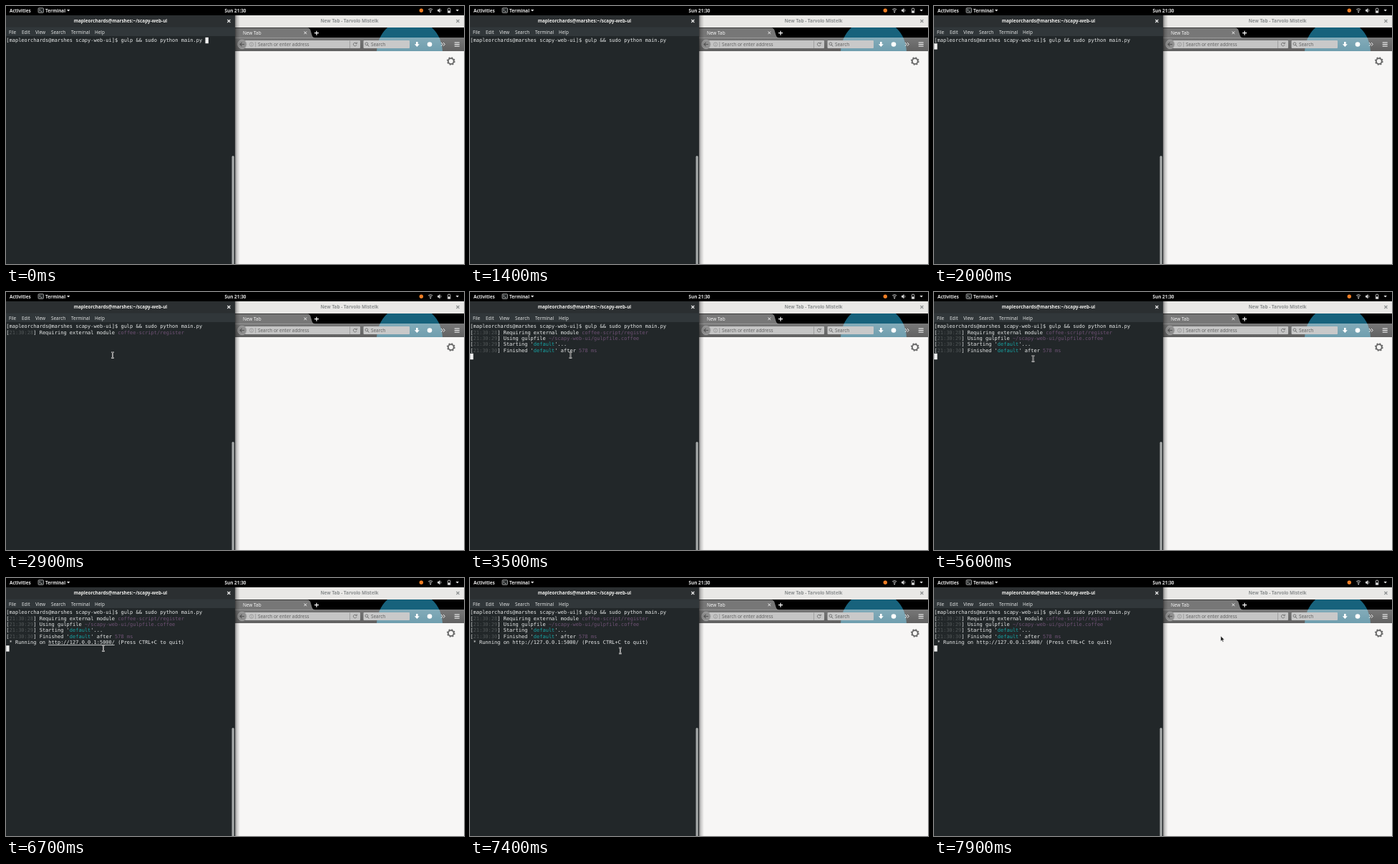
Recreate the animation shown at these times as an HTML page. Size 640 by 360 pixels, loop 8000 ms.

```html
<!DOCTYPE html>
<html lang="en">
<head>
<meta charset="utf-8">
<title>Terminal and browser</title>
<style>
html, body { margin: 0; width: 100%; height: 100%; overflow: hidden; background: #000; }
svg { display: block; width: 640px; height: 360px; }
text { font: 6.4px "Noto Sans", "Open Sans", sans-serif; white-space: pre; }
.bold { font-weight: 700; }
.semi { font-weight: 600; }
#term text { font: 7px "DejaVu Sans Mono", monospace; fill: #e9ebeb; }
#term .dim { fill: #525758; }
#term .path { fill: #6f5275; }
#term .task { fill: #16a5a5; }
.line { fill: none; stroke: currentColor; }
</style>
</head>
<body>
<svg viewBox="0 0 640 360">
  <defs>
    <clipPath id="chrome"><rect x="320" y="30" width="320" height="33"/></clipPath>
    <linearGradient id="bar" x2="0" y2="1">
      <stop stop-color="#fff" stop-opacity=".47"/><stop offset="1" stop-color="#fff" stop-opacity=".38"/>
    </linearGradient>
    <linearGradient id="shade">
      <stop stop-opacity=".5"/><stop offset=".35" stop-opacity=".2"/><stop offset="1" stop-opacity="0"/>
    </linearGradient>
  </defs>
  <rect width="640" height="360"/>

  <!-- desktop bar -->
  <g fill="#e6e6e6" color="#e6e6e6">
    <text class="semi" x="5" y="8.5">Activities</text>
    <rect x="45" y="2.8" width="7.5" height="6.6" rx="1" fill="#25292a" stroke="#c8c8c8" stroke-width=".7"/>
    <path class="line" d="M46.5 4.5l1.4 1.2-1.4 1.2M48.5 7.6h2" stroke-width=".7"/>
    <text class="semi" x="55" y="8.5">Terminal</text>
    <path d="M85 4.9h4.4l-2.2 2.6z"/>
    <text class="semi" x="320.5" y="8.5" text-anchor="middle">Sun 21:30</text>
    <circle cx="580.3" cy="6.2" r="2.7" fill="#ee7d24"/>
    <path class="line" d="M590.2 5q3-2.6 6 0M591.5 6.7q1.7-1.5 3.4 0" stroke-width=".9"/>
    <circle cx="593.2" cy="8.4" r=".9"/>
    <path d="M603 5h1.4l2-1.9v6.4l-2-1.9H603z"/>
    <path class="line" d="M607.5 4.7q1 1.5 0 3" stroke-width=".7"/>
    <path class="line" d="M617.3 3.8h1.1v-.7h1.4v.7h1.1v5.6h-3.6z" stroke-width=".7"/>
    <rect x="617.6" y="6.5" width="3" height="2.7"/>
    <path d="M628.5 4.9h4.4l-2.2 2.6z"/>
  </g>

  <!-- browser window -->
  <rect x="320" y="13" width="320" height="17" fill="#e9e8e6"/>
  <text class="bold" x="480" y="23.4" text-anchor="middle" fill="#8b8e8f">New Tab - Tarvolo Mistelk</text>
  <path class="line" d="M629.4 19l4 4m0-4l-4 4" color="#8b8e8f" stroke-width="1.1"/>
  <g clip-path="url(#chrome)">
    <circle cx="564" cy="64" r="46" fill="#17627c"/>
    <path d="M320 30.5H421q4 0 5 5l1.5 5q1 4 5 4H320z" fill="#777"/>
    <rect x="320" y="44" width="320" height="19" fill="url(#bar)"/>
  </g>
  <text x="331" y="40.2" fill="#f4f4f4">New Tab</text>
  <path class="line" d="M416.5 35.6l3.6 3.6m0-3.6l-3.6 3.6" color="#eee" stroke-width="1"/>
  <path class="line" d="M431 37.7h6m-3-3v6" color="#fff" stroke-width="1.2"/>
  <rect x="334" y="48" width="161" height="11" rx="1" fill="#c5c5c5"/>
  <circle cx="330" cy="53.5" r="6.2" fill="#8f8f8f" stroke="#b4b4b4" stroke-width=".6"/>
  <path class="line" d="M333 53.5h-6m2.6-2.6l-2.6 2.6 2.6 2.6" color="#555" stroke-width="1.1"/>
  <g color="#858585">
    <circle class="line" cx="343" cy="53.6" r="2.7" stroke-width=".6"/>
    <path class="line" d="M343 53.2v2M343 51.8v.7M348.7 50v7.2M480.5 48.4v10.4" stroke-width=".6"/>
  </g>
  <text x="352" y="55.9" fill="#626262">Search or enter address</text>
  <path class="line" d="M489.6 52.2a2.3 2.3 0 1 0 .3 2M490.3 50.5v2h-2" color="#666" stroke-width=".8"/>
  <rect x="499.5" y="48" width="64.5" height="11" rx="1" fill="#c9c9c9"/>
  <path class="line" d="M505.2 54.2l2 2.2" color="#666" stroke-width="1"/>
  <circle class="line" cx="503.9" cy="52.8" r="1.9" color="#666" stroke-width=".8"/>
  <text x="510" y="55.9" fill="#626262">Search</text>
  <g color="#fff" fill="#fff">
    <path d="M573 50h2.6v3.2h2.2l-3.5 3.8-3.5-3.8h2.2z"/>
    <circle cx="592" cy="53.5" r="3.3"/>
    <path class="line" d="M608 51l2.3 2.4-2.3 2.4M611 51l2.3 2.4-2.3 2.4" stroke-width=".9"/>
    <path class="line" d="M626.7 51h7m-7 2.5h7m-7 2.5h7" stroke-width="1.1"/>
  </g>
  <rect x="320" y="63" width="320" height="297" fill="#f7f6f5"/>
  <g transform="translate(621.8 77)" fill="none" stroke="#686868">
    <circle r="3.9" stroke-width="1.8"/>
    <circle r="5.1" stroke-width="1.5" stroke-dasharray="2 2.005"/>
  </g>
  <rect x="320" y="13" width="7" height="347" fill="url(#shade)"/>

  <!-- terminal window -->
  <rect y="13" width="320" height="17" fill="#2b2f31"/>
  <rect y="29.5" width="320" height="13" fill="#31373a"/>
  <rect y="42" width="320" height="318" fill="#222729"/>
  <rect x="315.6" y="209" width="3.2" height="153" rx="1.6" fill="#a5a9a9"/>
  <text class="bold" x="160" y="23.4" text-anchor="middle" fill="#eeeeec">mapleorchards@marshes:~/scapy-web-ui</text>
  <path class="line" d="M309.4 19l4 4m0-4l-4 4" color="#eee" stroke-width="1.1"/>
  <g id="menu" fill="#dfe1e1"></g>
  <g id="term"></g>
  <rect id="caret" width="4.4" height="8.4" fill="#f2f2f2"/>

  <!-- pointers -->
  <g id="beam" fill="none">
    <path d="M-2-4Q0-4 0-3Q0-4 2-4M0-3V3M-2 4Q0 4 0 3Q0 4 2 4" stroke="#eee" stroke-width="1.7"/>
    <path d="M-2-4Q0-4 0-3Q0-4 2-4M0-3V3M-2 4Q0 4 0 3Q0 4 2 4" stroke="#222" stroke-width=".6"/>
  </g>
  <path id="arrow" d="M0 0V7.2L1.7 5.7 2.8 8.2 4 7.7 2.9 5.3H5.1z" fill="#111" stroke="#fff" stroke-width=".5"/>
</svg>
<script>
const LOOP = 8000, ROW = 8.4, TOP = 43.8, CELL = 4.214;
const $ = id => document.getElementById(id);

function add(parent, tag, attrs, content = "") {
  const el = document.createElementNS("http://www.w3.org/2000/svg", tag);
  for (const key in attrs) el.setAttribute(key, attrs[key]);
  el.textContent = content;
  parent.append(el);
  return el;
}

[["File", 4], ["Edit", 22], ["View", 41], ["Search", 63], ["Terminal", 91], ["Help", 124]]
  .forEach(([label, x]) => add($("menu"), "text", { x, y: 38.8 }, label));

const stamp = s => [["["], ["21:30:" + s, "dim"], ["] "]];
const output = [
  [0, [["[mapleorchards@marshes scapy-web-ui]$ gulp && sudo python main.py"]]],
  [2600, [...stamp(28), ["Requiring external module "], ["coffee-script/register", "path"]]],
  [3000, [...stamp(29), ["Using gulpfile "], ["~/scapy-web-ui/gulpfile.coffee", "path"]]],
  [3000, [...stamp(29), ["Starting '"], ["default", "task"], ["'..."]]],
  [3500, [...stamp(30), ["Finished '"], ["default", "task"], ["' after "], ["578 ms", "path"]]],
  [5800, [[" * Running on http://127.0.0.1:5000/ (Press CTRL+C to quit)"]]]
];
const rows = output.map(([start, parts], i) => {
  const el = add($("term"), "text", { x: 0.3, y: TOP + 6.4 + i * ROW });
  parts.forEach(([text, cls = ""]) => add(el, "tspan", { class: cls }, text));
  return { start, el };
});
const link = add($("term"), "rect", {
  x: 14 * CELL, y: TOP + 5 * ROW + 7.2, width: 22 * CELL, height: .8, fill: "#e9ebeb"
});

// Times at which the text caret toggles, starting visible.
const blinks = [100, 700, 1400, 1900, 2500, 3100, 3700, 4300, 4900, 5500, 6100, 6400, 7000, 7600];

// Pointer stops: time, x, y
const path = [
  [2500, 186, 136], [2700, 162, 104], [2900, 149, 88], [3200, 142, 88], [3500, 140.5, 88],
  [3800, 139, 93], [4100, 138.5, 93], [5900, 138.5, 93], [6400, 136, 98],
  [7100, 136, 98], [7350, 185, 103], [7600, 310, 95], [7900, 400.7, 81]
];

function pointerAt(t) {
  const i = path.findIndex(p => p[0] > t);
  if (i < 0) return path[path.length - 1].slice(1);
  const [a, b] = [path[i - 1], path[i]];
  const k = (t - a[0]) / (b[0] - a[0]);
  return [a[1] + (b[1] - a[1]) * k, a[2] + (b[2] - a[2]) * k];
}

const show = (el, on) => el.setAttribute("visibility", on ? "visible" : "hidden");

function draw(time) {
  const t = Math.floor(time / 100) * 100;
  rows.forEach(row => show(row.el, t >= row.start));
  show(link, t >= 5800 && t < 7200);

  const typed = t < 700;
  const line = typed ? 0 : rows.filter(row => t >= row.start).length;
  $("caret").setAttribute("x", typed ? 66 * CELL + .4 : .2);
  $("caret").setAttribute("y", TOP + line * ROW);
  show($("caret"), blinks.filter(b => t >= b).length % 2 === 0);

  const moving = t >= path[0][0];
  const [x, y] = moving ? pointerAt(t) : [0, 0];
  const inTerminal = x < 314;
  for (const id of ["beam", "arrow"]) {
    $(id).setAttribute("transform", `translate(${x} ${y})`);
    show($(id), moving && inTerminal === (id === "beam"));
  }
}

const began = performance.now();
function tick() {
  draw((performance.now() - began) % LOOP);
  requestAnimationFrame(tick);
}
tick();
</script>
</body>
</html>
```
